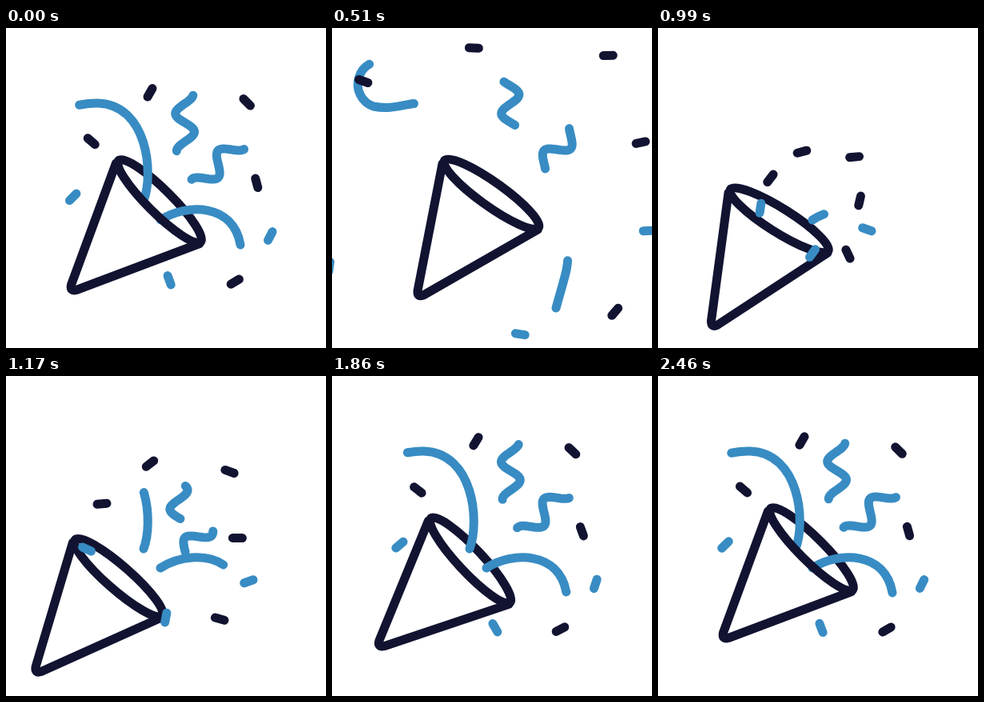
These frames come from a looping animation (400x400 px, 2500 ms). An HTML page with a canvas:

```html
<!DOCTYPE html>
<html lang="en">
<head>
<meta charset="utf-8">
<title>Party popper</title>
<style>
  html, body { margin: 0; width: 100%; height: 100%; overflow: hidden; background: #fff; }
  canvas { display: block; width: 400px; height: 400px; }
</style>
</head>
<body>
<canvas id="stage" width="400" height="400"></canvas>
<script>
const LOOP = 2500, BURST = 885;
const NAVY = '#121331', BLUE = '#388cc3';
const ctx = document.getElementById('stage').getContext('2d');

const clamp = x => Math.max(0, Math.min(1, x));
const smooth = x => { x = clamp(x); return x * x * (3 - 2 * x); };
const rad = deg => deg * Math.PI / 180;
// Falls from 1 to 0 after the burst; everything thrown out settles with it.
const settle = t => Math.exp((BURST - t) / 190);

const RIM_BACK = new Path2D('M141 165.5A72 15 44.7 0 1 243 267.5');
const CONE_FRONT = new Path2D('M141 165.5A72 15 44.7 0 0 243 267.5' +
  'M137.5 169L81.5 321Q79.5 329.5 88 327.5L242 269.5');

// Ribbons show the part [tail, head] of a long curve. They run off to "end",
// later starters having a larger "delay"; after the burst the head catches up by "lag".
const STREAMERS = [
  {
    path: new Path2D('M172 216C185 182 177 96 115 94C93 93 78 103 52 98' +
      'A27 28 0 1 1 68 43C79 50 83 60 74 72'),
    tail: 0, head: 178, end: 341, delay: 1.55, lag: 480, slip: 0
  },
  {
    path: new Path2D('M193 240C226 219 284 219 293 271C297 292 293 304 289 318L280 350'),
    tail: 0, head: 125, end: 240, delay: 1.1, lag: 190, slip: 0
  }
];
const squiggle = (x, y, dx, dy) =>
  ({ x, y, dx, dy, tail: -1, head: 1.95, end: 3.5, delay: 2.6, lag: 7.8, slip: 2.4 });
const SQUIGGLES = [squiggle(224, 130, -0.8, -23.3), squiggle(257, 179, 16.5, -18)];

// Rest pose, flight away from it, and spin while leaving and arriving.
const dash = (color, x, y, angle, dx, dy, spinOut, spinIn) =>
  ({ color, x, y, angle, dx, dy, spinOut, spinIn });
const DASHES = [
  dash(NAVY, 180, 81, -60, -2, -43, -82, 68),
  dash(NAVY, 301, 93, 45, 34, -45, 93, -77),
  dash(NAVY, 107, 142, 41, -52, -58, -141, -142),
  dash(NAVY, 313, 194, 75, 56, -39, 65, -231),
  dash(NAVY, 286, 317, -31, 52, 29, 113, 145),
  dash(BLUE, 330, 260, -63, 50, -5, 43, -422),
  dash(BLUE, 84, 211, -45, -67, 67, 100, 218),
  dash(BLUE, 204, 315, 70, 24, 52, -43, -462)
];
const MOUTH = { x: 180, y: 242 };

// The cone winds up, kicks back at the burst, overshoots and drifts home.
function conePose(t) {
  if (t < BURST) return { x: 0, y: 0, turn: -14.6 * smooth(t / 870) };
  const kick = 1 - Math.exp((BURST - t) / 50);
  const away = 1 - smooth((t - 1000) / 1350);
  const swing = smooth((t - BURST) / 560);
  return {
    x: -57 * kick * away,
    y: 41 * kick * away,
    turn: -14.6 * (1 - swing) + 7 * swing * away
  };
}

function drawCone(path, { x, y, turn }) {
  ctx.save();
  ctx.translate(141 + x, 166 + y);
  ctx.rotate(rad(turn));
  ctx.translate(-141, -166);
  ctx.strokeStyle = NAVY;
  ctx.stroke(path);
  ctx.restore();
}

function visiblePart({ tail, head, end, delay, lag, slip }, t) {
  if (t >= BURST) return [tail - slip * settle(t), head - lag * settle(t)];
  const x = clamp(t / 810);
  return [
    tail + (end - tail) * x ** delay,
    head + (end - head) * smooth(x) ** (0.75 * delay)
  ];
}

function drawStreamer(ribbon, t) {
  const [from, to] = visiblePart(ribbon, t);
  if (to - from < 1) return;
  ctx.setLineDash([to - from, 9999]);
  ctx.lineDashOffset = -from;
  ctx.strokeStyle = BLUE;
  ctx.stroke(ribbon.path);
  ctx.setLineDash([]);
}

function drawSquiggle(wave, t) {
  const [from, to] = visiblePart(wave, t);
  if (to - from < 0.03) return;
  const { x, y, dx, dy } = wave, size = Math.hypot(dx, dy);
  const shift = t < BURST ? 0 : settle(t);
  const steps = Math.ceil((to - from) * 16);
  ctx.beginPath();
  for (let i = 0; i <= steps; i++) {
    const u = from + (to - from) * i / steps;
    const side = 11.5 * Math.cos(Math.PI * u) / size;
    ctx.lineTo(x + dx * u - dy * side - 38 * shift, y + dy * u + dx * side + 58 * shift);
  }
  ctx.strokeStyle = BLUE;
  ctx.stroke();
}

function drawDash(d, t) {
  let { x, y, angle } = d;
  if (t < BURST) {
    const k = (1 - Math.exp(-t / 310)) / 0.62;
    x += d.dx * k;
    y += d.dy * k;
    angle += d.spinOut * k ** 1.35;
  } else {
    const s = settle(t);
    x += (MOUTH.x - x) * 0.8 * s;
    y += (MOUTH.y - y) * 0.8 * s;
    angle += d.spinIn * s ** 0.75;
  }
  const c = 6 * Math.cos(rad(angle)), s = 6 * Math.sin(rad(angle));
  ctx.beginPath();
  ctx.moveTo(x - c, y - s);
  ctx.lineTo(x + c, y + s);
  ctx.strokeStyle = d.color;
  ctx.stroke();
}

function draw() {
  const t = performance.now() % LOOP;
  const pose = conePose(t);
  ctx.fillStyle = '#fff';
  ctx.fillRect(0, 0, 400, 400);
  ctx.lineWidth = 11;
  ctx.lineCap = ctx.lineJoin = 'round';
  drawCone(RIM_BACK, pose);
  STREAMERS.forEach(r => drawStreamer(r, t));
  SQUIGGLES.forEach(w => drawSquiggle(w, t));
  drawCone(CONE_FRONT, pose);
  DASHES.forEach(d => drawDash(d, t));
  requestAnimationFrame(draw);
}
draw();
</script>
</body>
</html>
```
